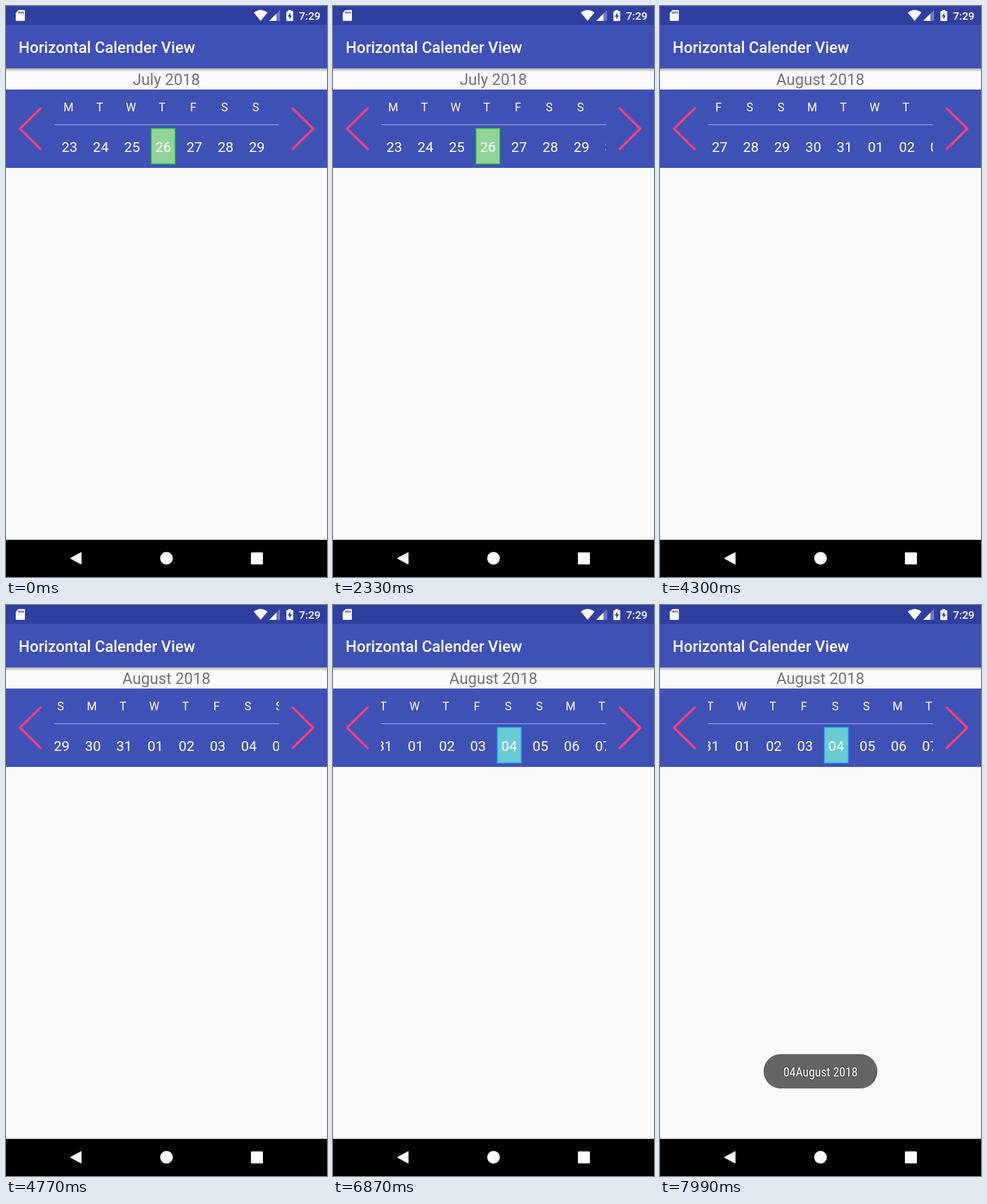
An HTML page with a canvas that plays this animation: 561 by 998 pixels, repeating every 9730 ms.

```html
<!DOCTYPE html>
<html lang="en">
<head>
<meta charset="utf-8">
<title>Horizontal Calender View</title>
<style>
  html, body { margin: 0; width: 100%; height: 100%; overflow: hidden; background: #fafafa; }
  canvas { display: block; }
</style>
</head>
<body>
<canvas id="stage" width="561" height="998"></canvas>
<script>
const ctx = document.getElementById('stage').getContext('2d');
const LOOP = 9730;
const PITCH = 54.54;
const FIRST_X = 111.1;
const VIEW = { left: 84, right: 477 };

// [time, scroll offset]: the list holds each offset until the next one
const SCROLL = [
  [0, 0], [2200, 1.5], [2330, 4], [2480, 11], [2660, 25], [2790, 43],
  [3020, 68.6], [3270, 97], [3430, 136], [3580, 180], [3710, 218],
  [4300, 225], [4440, 250], [4520, 273], [4690, 318], [4770, 341],
  [4940, 382], [5050, 409], [5155, 432], [5260, 448], [5370, 457.5]
];
const MONTH_AT = 3430;
const PICK_AT = 6870;
const TOAST = { start: 7460, end: 7990, steps: 7, text: '04August 2018' };

const roboto = (size, style = '') => `${style} ${size}px Roboto, sans-serif`;

function rect(x, y, w, h, color) {
  ctx.fillStyle = color;
  ctx.fillRect(x, y, w, h);
}

function poly(points, color) {
  ctx.beginPath();
  points.forEach(([x, y]) => ctx.lineTo(x, y));
  ctx.closePath();
  ctx.fillStyle = color;
  ctx.fill();
}

function text(str, x, y, font, color = '#fff', align = 'center') {
  ctx.font = font;
  ctx.textAlign = align;
  ctx.fillStyle = color;
  ctx.fillText(str, x, y);
}

function drawStatusBar() {
  rect(0, 0, 561, 33, '#303f9f');

  // memory card
  poly([[22, 7], [32, 7], [33, 8], [33, 25], [32, 26], [18, 26], [17, 25], [17, 12]], '#fff');
  for (const x of [22, 25.4, 28.8]) rect(x, 9.5, 1.8, 4, '#303f9f');

  // wifi
  ctx.beginPath();
  ctx.moveTo(445, 26);
  ctx.lineTo(433, 11.5);
  ctx.quadraticCurveTo(445, 2.5, 457, 11.5);
  ctx.closePath();
  ctx.fillStyle = '#fff';
  ctx.fill();

  // mobile signal
  poly([[460, 26], [479, 26], [479, 7]], 'rgba(255,255,255,.3)');
  poly([[460, 26], [472.5, 26], [472.5, 13.5]], '#fff');

  // battery
  rect(493.5, 7, 5, 3, '#fff');
  ctx.beginPath();
  ctx.roundRect(490, 9, 12, 17.3, 1.3);
  ctx.fill();
  poly([[497, 11.5], [492.5, 18.5], [495.3, 18.5], [495.3, 23.5], [499.7, 16.5], [497, 16.5]], '#303f9f');

  text('7:29', 512, 23.5, roboto(19.1, '500'), '#fff', 'left');
}

function drawHeader() {
  const shade = ctx.createLinearGradient(0, 109, 0, 115);
  shade.addColorStop(0, 'rgba(0,0,0,.3)');
  shade.addColorStop(1, 'rgba(0,0,0,0)');
  rect(0, 109, 561, 6, shade);
  rect(0, 33, 561, 76, '#3f51b5');
  text('Horizontal Calender View', 22, 81.5, roboto(27.27, '500'), '#fff', 'left');
}

function drawArrow(tip, back) {
  ctx.beginPath();
  ctx.moveTo(back, 179);
  ctx.lineTo(tip, 214.5);
  ctx.lineTo(back, 250);
  ctx.strokeStyle = '#ff4081';
  ctx.lineWidth = 4;
  ctx.lineCap = ctx.lineJoin = 'round';
  ctx.stroke();
}

function drawMark(x, fill, border) {
  rect(x - 21.8, 213, 43.6, 64, border);
  rect(x - 20.2, 214.6, 40.4, 60.8, fill);
}

function drawDays(t) {
  const shift = SCROLL.findLast(([at]) => at <= t)[1];
  ctx.save();
  ctx.beginPath();
  ctx.rect(VIEW.left, 146, VIEW.right - VIEW.left, 137);
  ctx.clip();
  for (let i = 0; i < 18; i++) {
    const x = FIRST_X + i * PITCH - shift;
    if (x < VIEW.left - 40 || x > VIEW.right + 40) continue;
    const day = (22 + i) % 31 + 1;
    if (day === 26) drawMark(x, '#92d399', '#10b63a');
    if (day === 4 && t >= PICK_AT) drawMark(x, '#69ccd3', '#1b9af5');
    text('MTWTFSS'[i % 7], x - 1.9, 184.4, roboto(20));
    text(String(day).padStart(2, '0'), x, 254.6, roboto(24.5));
  }
  ctx.restore();
  rect(VIEW.left, 207, VIEW.right - VIEW.left, 1, 'rgba(255,255,255,.65)');
}

function drawCalendar(t) {
  text(t < MONTH_AT ? 'July 2018' : 'August 2018', 280.3, 138.3, roboto(27.27), '#737373');
  rect(0, 146, 561, 137, '#3f51b5');
  drawArrow(24.5, 60.5);
  drawArrow(537, 501);
  drawDays(t);
}

function toastFont() {
  const narrow = 'condensed 21.8px "Roboto Condensed", Roboto, sans-serif';
  ctx.font = narrow;
  return ctx.measureText(TOAST.text).width < 138 ? narrow : roboto(19.1);
}

function drawToast(t) {
  if (t < TOAST.start) return;
  const gap = (TOAST.end - TOAST.start) / (TOAST.steps - 1);
  const step = Math.min(TOAST.steps, Math.floor((t - TOAST.start) / gap + 1e-6) + 1);
  const left = 1 - step / TOAST.steps;
  ctx.save();
  ctx.globalAlpha = 1 - left * left;
  ctx.beginPath();
  ctx.roundRect(181, 785, 199, 60, 30);
  ctx.fillStyle = '#646464';
  ctx.fill();
  ctx.shadowColor = 'rgba(0,0,0,.7)';
  ctx.shadowBlur = 3;
  text(TOAST.text, 280.5, 823.6, toastFont());
  ctx.restore();
}

function drawNavBar() {
  rect(0, 933, 561, 65, '#000');
  ctx.lineJoin = 'round';
  ctx.lineWidth = 2;
  ctx.strokeStyle = '#fff';
  poly([[113.5, 965.3], [131, 955.8], [131, 974.8]], '#fff');
  ctx.stroke();
  ctx.beginPath();
  ctx.arc(280.5, 965.3, 11, 0, Math.PI * 2);
  ctx.fill();
  ctx.beginPath();
  ctx.roundRect(428, 955, 21, 21, 1.5);
  ctx.fill();
}

function draw(t) {
  rect(0, 0, 561, 998, '#fafafa');
  drawStatusBar();
  drawHeader();
  drawCalendar(t);
  drawToast(t);
  drawNavBar();
}

const start = performance.now();
function tick() {
  draw((performance.now() - start) % LOOP);
  requestAnimationFrame(tick);
}
tick();
</script>
</body>
</html>
```
